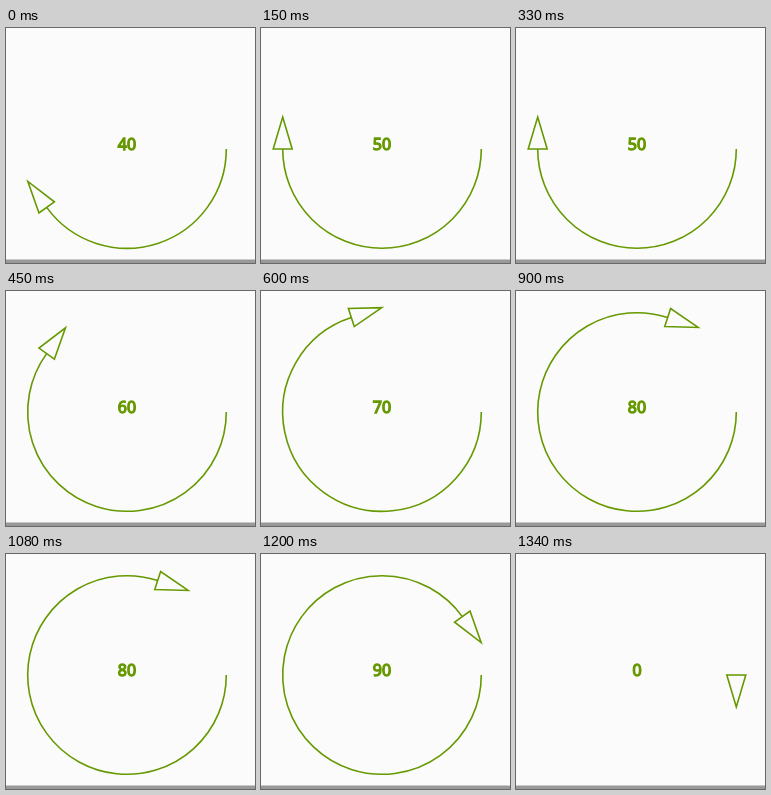
An HTML page that plays this animation: 249 by 235 pixels, repeating every 1.56 s.

```html
<!DOCTYPE html>
<html>
<head>
<meta charset="utf-8">
<style>
  html, body { margin: 0; width: 100%; height: 100%; overflow: hidden; background: #fbfbfb; }
  svg { display: block; }
  #dial { fill: none; stroke: #690; stroke-width: 1.6; }
  text { font: 16px "Open Sans", "Noto Sans", sans-serif; text-anchor: middle; fill: #690; stroke: #690; stroke-width: 1.4; }
</style>
</head>
<body>
<svg width="249" height="235" viewBox="0 0 249 235">
  <rect y="231.5" width="249" height="3.5" fill="#999"/>
  <g id="dial">
    <path id="arc"/>
    <path id="arrow" d="M-9.5 0H9.5L0 32Z"/>
  </g>
  <text id="label" x="121" y="121.5"></text>
</svg>
<script>
const CX = 121, CY = 121, R = 99.3, LOOP = 1560;
// [start time in ms, percent]
const steps = [[0, 40], [150, 50], [450, 60], [600, 70], [900, 80], [1200, 90], [1340, 0]];
const [arc, arrow, label] = ["arc", "arrow", "label"].map(id => document.getElementById(id));
let shown;

function draw(percent) {
  const deg = percent * 3.6, a = deg * Math.PI / 180;
  const x = CX + R * Math.cos(a), y = CY + R * Math.sin(a);
  arc.setAttribute("d", percent ? `M${CX + R} ${CY}A${R} ${R} 0 ${+(deg > 180)} 1 ${x} ${y}` : "");
  arrow.setAttribute("transform", `translate(${x} ${y}) rotate(${deg})`);
  label.textContent = percent;
}

const origin = performance.now();
function tick() {
  const t = (performance.now() - origin) % LOOP;
  const percent = steps.findLast(s => s[0] <= t)[1];
  if (percent !== shown) draw(shown = percent);
  requestAnimationFrame(tick);
}
tick();
</script>
</body>
</html>
```
